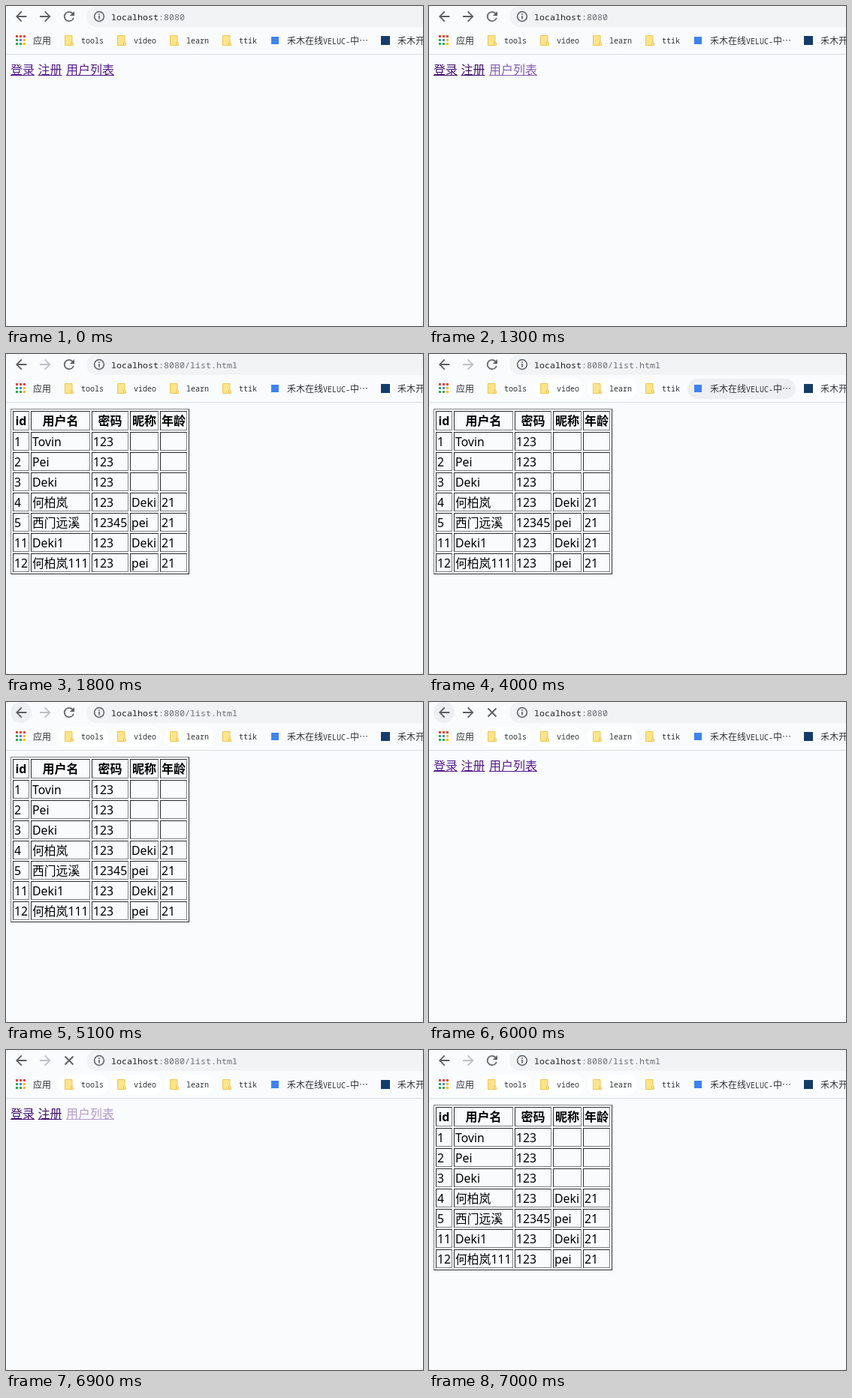
An HTML page for the animation above (8000 ms loop, 555 px wide and 427 px high).

```html
<!DOCTYPE html>
<html lang="zh-CN">
<head>
<meta charset="utf-8">
<title>用户列表</title>
<style>
  html, body { margin: 0; width: 100%; height: 100%; overflow: hidden; background: #f9fbfd; }
  svg, table { position: absolute; }
  svg { left: 0; top: 0; }

  .mono { font: 10px "Noto Sans Mono", "Noto Sans CJK SC", monospace; fill: #303336; }
  .cjk { font: 12px "Noto Sans CJK SC", "Noto Sans CJK", sans-serif; }
  .url { font-size: 11.667px; fill: #202124; }
  .dim { fill: #6b6f74; }
  .icon { fill: #5a5e63; }
  .line { fill: none; stroke: #5a5e63; stroke-width: 1.8; }
  .links { font: 16px "Noto Sans CJK SC", "Noto Sans CJK", sans-serif; }
  .links path { stroke: currentColor; }
  .links g { color: #551a8b; fill: currentColor; }

  table {
    left: 6px; top: 73px; width: 238px; table-layout: fixed;
    border: 1px outset gray; border-spacing: 2px; color: #000;
    font: 15.8px "Noto Sans", "Noto Sans CJK SC", "Noto Sans CJK", sans-serif;
  }
  th, td {
    box-sizing: border-box; height: 25px; padding: 2px 1px 0; border: 1px inset gray;
    line-height: 21px; white-space: nowrap; text-align: left;
  }
  th { height: 26px; padding: 1px; line-height: 22px; font-size: 16px; text-align: center; }

  /* One 8 s clock; every change is a hard cut. */
  .home, .list, .path, .forward, .reload, .stop, .back-hover, .tab-hover,
  .seen-tools, .seen-video, .seen-learn, .pressed, .others {
    animation: 8s step-end infinite;
  }
  .home { animation-name: home; }
  .list { animation-name: list; }
  .path { animation-name: path; }
  .forward { animation-name: forward; }
  .reload { animation-name: reload; }
  .stop { animation-name: stop; }
  .back-hover { animation-name: back-hover; }
  .tab-hover { animation-name: tab-hover; }
  .seen-tools { animation-name: seen-tools; }
  .seen-video { animation-name: seen-video; }
  .seen-learn { animation-name: seen-learn; }
  .pressed { animation-name: pressed; }
  .others { animation-name: others; }

  @keyframes home { 0%, 75% { opacity: 1 } 22.5%, 87.5% { opacity: 0 } }
  @keyframes list { 0%, 75% { opacity: 0 } 22.5%, 87.5% { opacity: 1 } }
  @keyframes path { 0%, 75% { opacity: 0 } 18.75%, 85% { opacity: 1 } }
  @keyframes forward { 0%, 75% { fill: #5a5e63 } 18.75%, 85% { fill: #bcc0c4 } }
  @keyframes reload { 0%, 22.5%, 78.75%, 87.5% { opacity: 1 } 18.75%, 75%, 85% { opacity: 0 } }
  @keyframes stop { 0%, 22.5%, 78.75%, 87.5% { opacity: 0 } 18.75%, 75%, 85% { opacity: 1 } }
  @keyframes back-hover { 0%, 80% { opacity: 0 } 63.75% { opacity: 1 } }
  @keyframes tab-hover { 0%, 51.25% { opacity: 0 } 50% { opacity: 1 } }
  @keyframes seen-video { 0% { opacity: 0 } 47.5% { opacity: 1 } }
  @keyframes seen-learn { 0% { opacity: 0 } 48.75% { opacity: 1 } }
  @keyframes seen-tools { 0% { opacity: 0 } 60% { opacity: 1 } }
  @keyframes pressed {
    0%, 22.5% { opacity: 1 }
    16.25%, 83.75% { opacity: .7 }
    17.5%, 85% { opacity: .55 }
    18.75%, 86.25% { opacity: .42 }
  }
  @keyframes others { 0%, 22.5% { color: #551a8b } 16.25%, 83.75% { color: #41106f } }
</style>
</head>
<body>
<svg width="555" height="427" viewBox="0 0 555 427">
  <defs>
    <path id="arrow" d="M8 -1H-4.17L1.42 -6.59 0 -8 -8 0 0 8 1.41 6.59 -4.17 1H8z"/>
    <g id="folder">
      <path d="M.5 .5h9.5v9l1.5 1v3H.5z" fill="#fee48c" stroke="#ebc655"/>
      <path d="M8.5 13v-3.5h2" fill="none" stroke="#ebc655"/>
    </g>
    <rect id="seen" y="33" width="67" height="27" rx="13.5" fill="#feffff"/>
  </defs>

  <!-- Toolbar -->
  <rect x="107" width="480" height="28" rx="14" fill="#f1f3f4"/>
  <circle class="back-hover" cx="20" cy="14" r="14" fill="#eeeff2"/>
  <use class="icon" href="#arrow" transform="translate(20.2 14) scale(.9)"/>
  <use class="forward" href="#arrow" transform="translate(52.3 14) scale(-.9 .9)"/>
  <g class="reload">
    <path class="icon" transform="translate(73.4 3.4) scale(.88)"
      d="M17.65 6.35A7.96 7.96 0 0 0 12 4a8 8 0 1 0 7.73 10h-2.08A6 6 0 1 1 12 6c1.66 0 3.14.69 4.22 1.78L13 11h7V4z"/>
  </g>
  <path class="line stop" d="M78.5 8.5l11 11m0-11l-11 11"/>
  <circle class="line" cx="124" cy="14" r="6.4" style="stroke-width:1.5"/>
  <path class="icon" d="M123.2 10.3h1.6v1.6h-1.6zM123.2 13.1h1.6v4.4h-1.6z"/>
  <g class="mono">
    <text class="url" x="140" y="18.5">localhost<tspan class="dim">:8080</tspan></text>
    <text class="url dim path" x="238" y="18.5">/list.html</text>
  </g>

  <!-- Bookmarks -->
  <use class="seen-tools" href="#seen" x="70"/>
  <use class="seen-video" href="#seen" x="140"/>
  <use class="seen-learn" href="#seen" x="210"/>
  <rect class="tab-hover" x="344" y="33" width="144" height="27" rx="13.5" fill="#eeeff2"/>
  <path d="M13 39h3v3h-3zM18 39h3v3h-3zM23 39h3v3h-3z" fill="#ea4335"/>
  <path d="M13 44h3v3h-3zM13 49h3v3h-3zM18 49h3v3h-3z" fill="#34a853"/>
  <path d="M18 44h3v3h-3z" fill="#4285f4"/>
  <path d="M23 44h3v3h-3zM23 49h3v3h-3z" fill="#fbbc04"/>
  <use href="#folder" x="78" y="39"/>
  <use href="#folder" x="148" y="39"/>
  <use href="#folder" x="218" y="39"/>
  <use href="#folder" x="288" y="39"/>
  <rect x="353" y="41" width="10" height="10" fill="#3f83ee"/>
  <rect x="499" y="40" width="12" height="12" fill="#143c69"/>
  <g class="mono">
    <text class="cjk" x="36" y="50.5">应用</text>
    <text x="100" y="50">tools</text>
    <text x="170" y="50">video</text>
    <text x="240" y="50">learn</text>
    <text x="310" y="50">ttik</text>
    <text x="374" y="50.5"><tspan class="cjk">禾木在线</tspan>VELUC-<tspan class="cjk">中…</tspan></text>
    <text class="cjk" x="521" y="50.5">禾木开</text>
  </g>
  <path d="M0 64.5h555" stroke="#dcdfe3"/>

  <!-- Home page -->
  <g class="links home">
    <g class="others">
      <text x="6" y="90.5">登录</text>
      <text x="42.5" y="90.5">注册</text>
      <path d="M6 92.5h32M42.5 92.5h32"/>
    </g>
    <g class="pressed">
      <text x="80" y="90.5">用户列表</text>
      <path d="M80 92.5h64"/>
    </g>
  </g>
</svg>

<table class="list">
  <colgroup>
    <col style="width:22px"><col style="width:79px"><col style="width:49px"><col style="width:38px"><col style="width:36px">
  </colgroup>
  <tr><th>id</th><th>用户名</th><th>密码</th><th>昵称</th><th>年龄</th></tr>
  <tr><td>1</td><td>Tovin</td><td>123</td><td></td><td></td></tr>
  <tr><td>2</td><td>Pei</td><td>123</td><td></td><td></td></tr>
  <tr><td>3</td><td>Deki</td><td>123</td><td></td><td></td></tr>
  <tr><td>4</td><td>何柏岚</td><td>123</td><td>Deki</td><td>21</td></tr>
  <tr><td>5</td><td>西门远溪</td><td>12345</td><td>pei</td><td>21</td></tr>
  <tr><td>11</td><td>Deki1</td><td>123</td><td>Deki</td><td>21</td></tr>
  <tr><td>12</td><td>何柏岚111</td><td>123</td><td>pei</td><td>21</td></tr>
</table>
</body>
</html>
```
